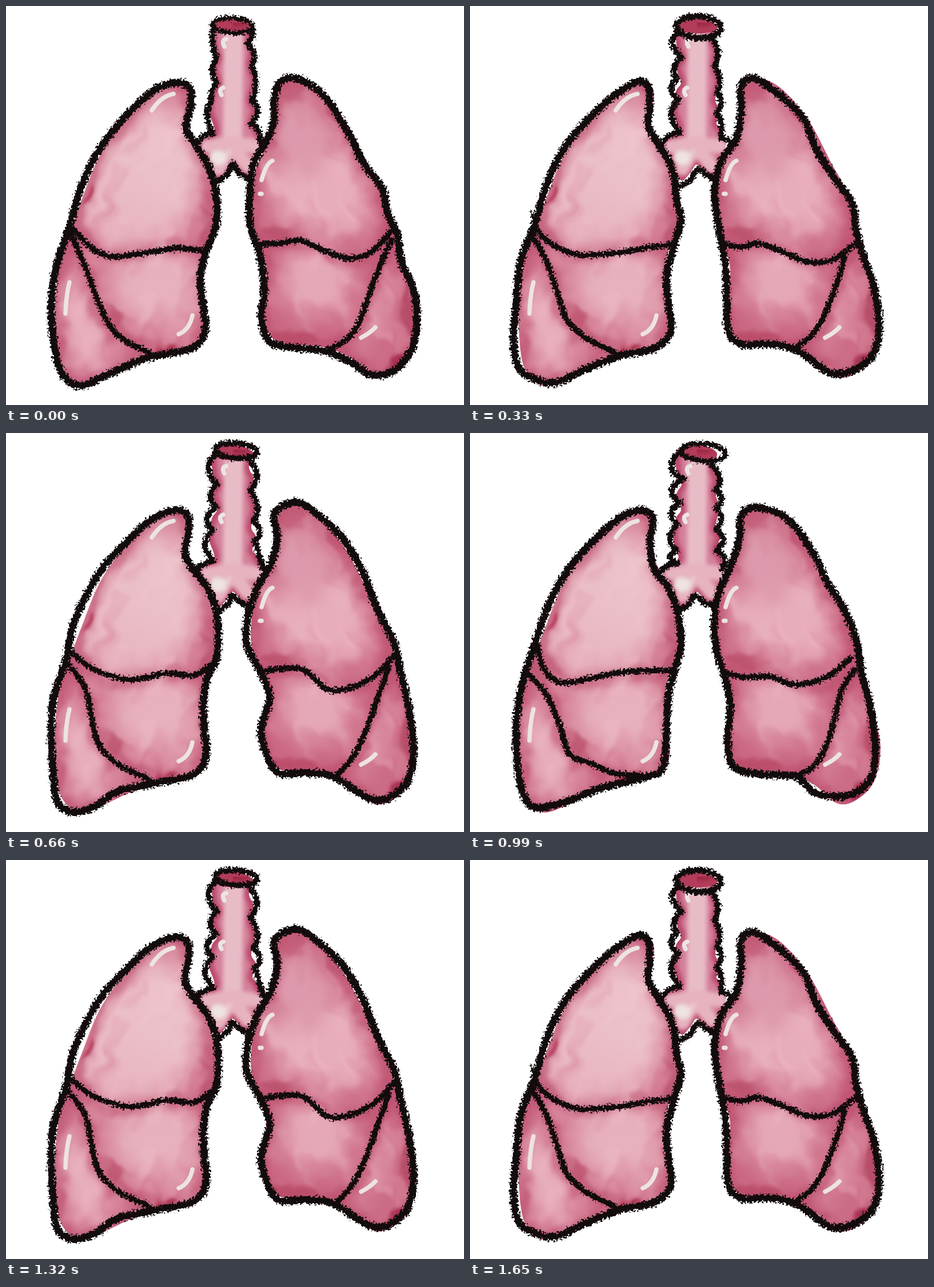
Write an HTML page that moves like this. It is 801x699 px and loops after 1980 ms.

```html
<!DOCTYPE html>
<html lang="en">
<head>
<meta charset="utf-8">
<title>Lungs</title>
<style>
  html, body { margin: 0; width: 100%; height: 100%; overflow: hidden; background: #fff; }
  svg { display: block; width: 801px; height: 699px; }
</style>
</head>
<body>
<script>
const STEP = 330;
const ORDER = [0, 1, 2, 3, 2, 1];
const INK = '#120c0c';

// Painted areas, which stay still under the moving line work
const LEFT = '300 134 268 141 215 190 165 260 132 340 114 388 97 430 87 500 85 560 92 625 110 655 132 665 170 652 240 620 325 597 346 578 349 540 341 480 347 430 362 400 367 350 360 300 340 255 319 215 317 190 322 155 315 138';
const RIGHT = '505 126 480 135 470 160 470 200 455 245 435 290 428 350 433 390 443 420 455 460 450 520 453 562 480 590 550 597 600 615 640 648 672 645 706 612 718 550 704 485 686 420 674 370 652 312 632 275 592 200 545 145';
const PIPE = '363 30 362 75 370 90 361 108 369 134 360 150 355 185 364 220 337 240 352 268 368 305 384 294 396 278 410 292 425 302 447 248 438 215 431 205 437 182 429 165 436 132 429 105 433 80 425 60 431 34 398 20';
const SEAMS = ['116 388 150 418 185 436 240 431 300 421 355 422', '110 400 142 470 162 535 195 576 255 606',
  '444 417 510 414 555 432 600 444 640 432 674 402', '674 408 652 460 632 515 610 570 570 600'];

// x, y, rx, ry, angle, colour
const LIGHTS = [
  [245, 300, 80, 112, 25, '#ebbfc8'], [195, 362, 62, 34, 10, '#e9b8c3'], [262, 490, 66, 58, 0, '#e7b1bd'],
  [135, 565, 26, 72, -12, '#e8b0bd'], [550, 320, 72, 66, 0, '#e9b2bf'], [515, 228, 40, 65, -12, '#dd9aac'],
  [590, 355, 50, 35, 20, '#e7acba'], [543, 482, 58, 50, 0, '#e5a8b7'], [642, 530, 22, 58, 24, '#dd93a8']];
const DARKS = [
  [683, 624, 22, 12, -40, '#9c1f40'], [278, 604, 26, 6, -8, '#9c0f30'], [138, 332, 5, 22, 20, '#b02549'],
  [485, 400, 38, 10, 5, '#b84c69'], [500, 150, 26, 16, -10, '#bf5673'], [190, 548, 10, 34, -30, '#b84c69'],
  [352, 385, 9, 34, 0, '#b95470'], [505, 585, 44, 9, 5, '#b54663'], [706, 540, 9, 52, -5, '#b04661']];
const SHINES = ['M255 183Q271 158 293 154', 'M111 484Q105 508 104 539', 'M302 575Q321 567 326 542',
  'M447 305Q455 275 466 271', 'M444 329h3', 'M621 581Q637 573 646 563', 'M385 58Q376 60 382 71', 'M380 143Q371 146 377 156'];

// Line work per pose; bump rows alternate between creases and bulges
const POSES = [
  {
    lungs: ['300 134 322 145 323 175 315 215 334 246 358 290 369 345 366 390 350 430 340 475 344 520 349 560 338 590 310 604 245 617 190 640 130 665 97 642 84 590 79 530 87 460 110 390 130 320 155 265 180 228 215 187 260 147',
      '502 126 478 135 469 165 468 205 452 242 432 280 426 330 427 385 441 425 450 470 451 510 446 545 460 587 500 598 555 604 600 622 640 646 680 638 710 600 719 545 712 495 692 450 684 400 668 365 658 320 625 275 603 230 570 175 540 143'],
    seams: ['117 390 150 424 185 439 240 433 300 424 352 431', '112 396 138 455 160 515 185 565 215 590 250 606',
      '444 417 475 416 515 411 555 428 600 442 640 430 672 396', '674 410 654 455 637 500 615 560 590 588 560 603',
      '372 306 388 294 396 276 407 292 424 303'],
    lid: [396, 34, 35, 13, 3, 8],
    bumps: ['363 36 361 62 368 92 361 112 368 135 360 150 359 166 352 190 361 223 344 229 336 240',
      '431 40 430 55 422 65 434 85 430 105 437 135 430 165 440 184 428 208 440 215 446 242']
  },
  {
    lungs: ['295 132 313 145 314 180 312 210 330 243 347 270 357 300 362 345 369 375 355 425 344 470 346 515 351 570 322 600 262 613 200 637 150 660 110 652 84 632 76 585 81 520 88 450 112 385 130 325 150 275 175 235 215 190 255 155',
      '495 126 474 140 474 185 465 235 440 270 428 320 432 370 441 420 448 470 449 520 452 570 475 593 525 592 575 605 635 644 690 627 712 592 715 550 706 490 685 430 675 390 668 345 640 305 605 250 585 200 560 172 530 147'],
    seams: ['112 385 140 415 190 436 260 432 310 423 355 418', '108 400 135 450 152 500 170 550 205 583 260 610',
      '445 418 475 422 505 416 550 432 590 448 635 444 676 414', '655 440 640 490 618 545 595 580 565 600',
      '362 316 383 308 398 286 412 294 428 305'],
    tail: 'M107 358L112 385',
    lid: [400, 37, 39, 19, 3, 11],
    bumps: ['362 48 354 66 370 90 357 108 362 128 352 145 365 165 352 190 367 222 348 228 336 240',
      '424 58 433 80 428 104 437 130 432 152 439 168 432 188 440 208 438 232 448 233 458 242']
  },
  {
    lungs: ['295 135 318 145 319 175 313 210 327 238 350 268 366 305 371 350 368 395 352 430 345 475 347 520 350 565 330 597 270 612 195 628 155 655 115 664 90 645 82 590 79 530 83 465 104 400 118 335 140 285 170 235 205 197 250 155',
      '508 121 470 140 474 185 463 230 440 270 424 315 421 370 445 418 461 465 446 525 472 592 520 595 570 601 645 643 695 620 712 570 706 490 688 410 678 365 650 310 620 235 585 180 545 143'],
    seams: ['113 382 150 412 215 432 280 421 330 424 362 402', '108 405 138 445 150 500 162 545 195 580 250 606',
      '448 418 515 413 560 448 600 447 645 425 677 392', '670 410 655 450 630 520 605 570 578 600',
      '372 312 388 300 395 285 408 295 424 303'],
    lid: [402, 31, 37, 13, 4, 10],
    bumps: ['370 34 354 60 369 90 357 108 367 130 351 150 362 170 348 195 363 224 346 230 332 240',
      '428 50 439 75 427 100 440 130 432 155 444 170 435 190 442 210 448 236']
  },
  {
    lungs: ['300 135 320 150 315 190 323 240 345 268 362 310 369 370 358 415 347 460 344 510 338 585 310 602 230 622 170 645 115 656 92 630 82 570 81 510 91 440 110 380 128 325 150 275 180 228 230 175 265 147',
      '500 130 474 145 471 185 455 235 435 280 427 330 432 385 445 425 455 480 450 540 462 585 510 598 570 602 605 631 660 635 700 607 709 555 700 480 685 420 677 370 655 310 625 262 600 210 555 150'],
    seams: ['117 370 130 415 160 437 210 430 260 420 310 416 358 417', '105 425 135 460 158 515 175 563 215 580 255 597 300 599',
      '450 420 480 428 525 427 570 441 625 427 665 395', '672 415 650 450 638 500 622 550 600 585 575 598',
      '370 308 383 300 393 285 410 297 424 302'],
    lid: [408, 34, 39, 15, 4, 9],
    bumps: ['370 30 352 60 374 80 353 100 367 122 352 140 363 160 349 184 362 205 350 216 362 228 345 233 332 245',
      '422 55 437 78 430 100 440 115 430 132 440 150 430 168 443 187 430 205 445 220 440 238']
  }
];

const points = text => {
  const n = text.split(' ').map(Number);
  return n.filter((_, i) => i % 2 === 0).map((x, i) => [x, n[2 * i + 1]]);
};

// Smooth curve through all points
function curve(text, closed) {
  const p = points(text), n = p.length;
  const at = i => closed ? p[(i + n) % n] : p[Math.max(0, Math.min(n - 1, i))];
  let d = 'M' + p[0];
  for (let i = 0; i < n - !closed; i++) {
    const [a, b, c, e] = [at(i - 1), at(i), at(i + 1), at(i + 2)];
    const c1 = b.map((v, k) => v + (c[k] - a[k]) / 6);
    const c2 = c.map((v, k) => v - (e[k] - b[k]) / 6);
    d += `C${c1} ${c2} ${c}`;
  }
  return d + (closed ? 'Z' : '');
}

function bumpy(text) {
  const p = points(text);
  let d = 'M' + p[0];
  for (let i = 1; i + 1 < p.length; i += 2) {
    const peak = p[i].map((v, k) => 2 * v - (p[i - 1][k] + p[i + 1][k]) / 2);
    d += `Q${peak} ${p[i + 1]}`;
  }
  return d;
}

const line = (d, width, colour = INK, extra = '') =>
  `<path d="${d}" fill="none" stroke="${colour}" stroke-width="${width}" ${extra}/>`;
const oval = ([x, y, rx, ry, angle, colour], scale = 1, extra = '') =>
  `<ellipse rx="${rx * scale}" ry="${ry * scale}" transform="translate(${x} ${y}) rotate(${angle})" fill="${colour}" ${extra}/>`;

let seed = 7;
const rand = () => (seed = seed * 16807 % 2147483647) / 2147483647;

// Faint overlapping brush marks
function brush() {
  let out = '';
  for (let i = 0; i < 110; i++) {
    const right = i % 2, x = (right ? 440 : 90) + rand() * 260, y = 140 + rand() * 500;
    const lean = right ? 25 : -25, len = 25 + rand() * 45;
    out += line(`M${x} ${y}q${lean * rand()} ${len / 2} ${lean} ${len}`, 8 + rand() * 16,
      rand() < .5 ? '#f2cdd4' : '#c45f7b', 'opacity=".13"');
  }
  return out;
}

const area = 'filterUnits="userSpaceOnUse" x="0" y="0" width="801" height="699" color-interpolation-filters="sRGB"';
const blur = (id, size) => `<filter id="${id}" ${area}><feGaussianBlur stdDeviation="${size}"/></filter>`;
const rough = (id, freq, scale, n) => `<filter id="${id}" ${area}>
  <feTurbulence type="fractalNoise" baseFrequency="${freq}" numOctaves="2" seed="${n}"/>
  <feDisplacementMap in="SourceGraphic" scale="${scale}" xChannelSelector="R" yChannelSelector="G"/></filter>`;

const leftLung = curve(LEFT, true), rightLung = curve(RIGHT, true), pipe = curve(PIPE, true);
const edges = [leftLung, rightLung, ...SEAMS.map(s => curve(s))];

const lungPaint = `
  <g clip-path="url(#lungs)">
    <path d="${leftLung}" fill="#d37a92"/><path d="${rightLung}" fill="#cc6c86"/>
    <g filter="url(#wash)">
      <g filter="url(#soft)">${LIGHTS.map(b => oval(b, 1.35, 'fill-opacity=".5"') + oval(b)).join('')}</g>
      <g filter="url(#mist)" opacity=".55">${edges.map(d => line(d, 20, '#b33f60')).join('')}</g>
      <g filter="url(#haze)">${DARKS.map(b => oval(b, 1, 'opacity=".7"')).join('')}${brush()}</g>
    </g>
  </g>`;

const pipePaint = `
  <g clip-path="url(#pipe)">
    <path d="${pipe}" fill="#d4819a"/>
    <g filter="url(#haze)">
      ${line(pipe, 17, '#b23a5b', 'opacity=".75"')}
      ${line('M398 55L396 245', 34, '#e8bcc6')}
      ${line('M352 246L394 240L438 246M394 245L372 285M394 245L422 280', 25, '#e6b3bf')}
      ${oval([371, 266, 16, 13, 0, '#eee3e0'])}
      ${line('M384 264L392 253', 4, '#f0dcdc')}
    </g>
    ${oval([397, 34, 36, 14, 2, '#b23c59'])}
    ${oval([397, 29, 28, 7, 2, '#9c2746'], 1, 'filter="url(#haze)"')}
  </g>`;

const poseArt = (p, i) => `
  <g class="pose" filter="url(#ink${i})" visibility="hidden">
    ${p.bumps.map(b => line(bumpy(b), 10)).join('')}
    ${oval([...p.lid.slice(0, 5), 'none'], 1, `stroke="${INK}" stroke-width="${p.lid[5]}"`)}
    ${p.seams.map(s => line(curve(s), 10)).join('')}
    ${p.lungs.map(s => line(curve(s, true), 13)).join('')}
    ${p.tail ? line(p.tail, 4) : ''}
  </g>`;

document.body.innerHTML = `
  <svg viewBox="0 0 801 699" stroke-linecap="round" stroke-linejoin="round">
    <defs>
      <clipPath id="lungs"><path d="${leftLung}"/><path d="${rightLung}"/></clipPath>
      <clipPath id="pipe"><path d="${pipe}"/></clipPath>
      ${blur('soft', 15)}${blur('mist', 8)}${blur('haze', 3.5)}
      ${rough('wash', .025, 34, 4)}
      ${POSES.map((_, i) => rough('ink' + i, .28, 13, i + 1)).join('')}
    </defs>
    ${lungPaint}${pipePaint}
    ${SHINES.map(d => line(d, 7.5, '#ece4e2')).join('')}
    ${POSES.map(poseArt).join('')}
  </svg>`;

const layers = document.querySelectorAll('.pose');
const start = performance.now();
let shown = -1;

function draw() {
  const pose = ORDER[Math.floor((performance.now() - start) / STEP) % ORDER.length];
  if (pose !== shown) {
    layers.forEach((g, i) => g.setAttribute('visibility', i === pose ? 'visible' : 'hidden'));
    shown = pose;
  }
  requestAnimationFrame(draw);
}
draw();
</script>
</body>
</html>
```
